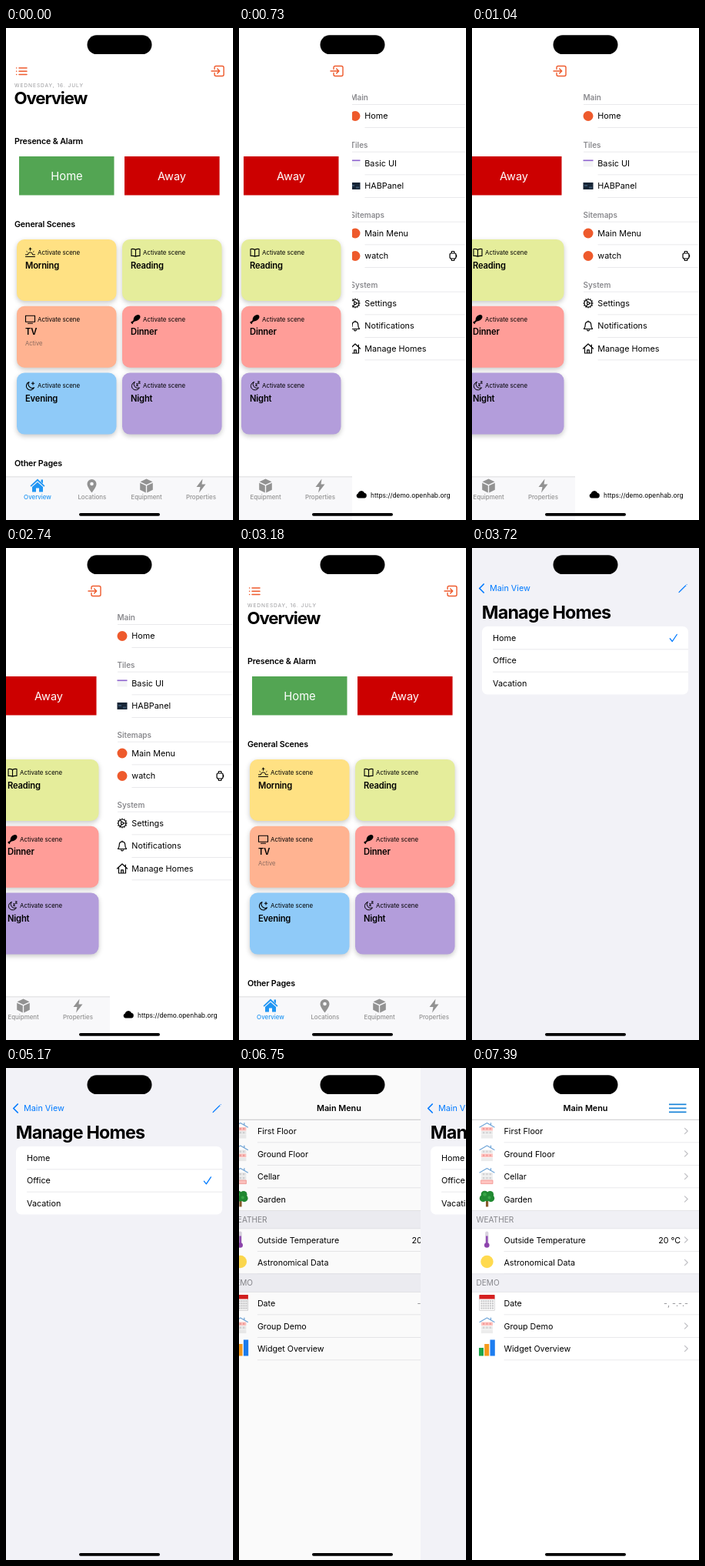
These frames come from a looping animation (295x640 px, 8 s). An HTML page with a canvas:

```html
<!DOCTYPE html>
<html lang="en">
<head>
<meta charset="utf-8">
<title>Smart home app</title>
<style>
html, body { margin: 0; width: 100%; height: 100%; overflow: hidden; background: #fff; }
canvas { display: block; width: 295px; height: 640px; }
</style>
</head>
<body>
<canvas id="stage" width="295" height="640"></canvas>
<script>
const W = 295, H = 640, LOOP = 8000, MENU_WIDTH = 161, HOME_CHOSEN = 5170;
const BLUE = '#007aff', ORANGE = '#ee5a2c', GRAY = '#8a8a8e', LINE = '#e2e2e5', PAPER = '#f2f2f7';
const ctx = document.getElementById('stage').getContext('2d');

// Moments at which the screen refreshes.
const TICKS = [0, 500, 610, 720, 830, 930, 1040, 2740, 2860, 2960, 3070, 3180, 3290, 3410,
  3510, 3620, 3720, HOME_CHOSEN, 6460, 6630, 6740, 6850, 6970, 7080, 7390];

// Critically damped spring from 0 to 1.
function spring(t, start, rate) {
  const u = Math.max(0, t - start) / 1000 * rate;
  return 1 - (1 + u) * Math.exp(-u);
}

// Text placed by the middle of its capitals.
function text(str, x, y, size, { color = '#000', weight = 400, align = 'left', track = 0 } = {}) {
  ctx.font = `${weight} ${size}px Inter, sans-serif`;
  ctx.letterSpacing = `${track * size}px`;
  ctx.textAlign = align;
  ctx.fillStyle = color;
  ctx.fillText(str, x, y + size * 0.364);
}

function rect(x, y, w, h, color, radius = 0) {
  ctx.fillStyle = color;
  ctx.beginPath();
  ctx.roundRect(x, y, w, h, radius);
  ctx.fill();
}

function disc(x, y, r, color) {
  ctx.fillStyle = color;
  ctx.beginPath();
  ctx.arc(x, y, r, 0, Math.PI * 2);
  ctx.fill();
}

function at(x, y, draw) {
  ctx.save();
  ctx.translate(x, y);
  draw();
  ctx.restore();
}

function stroke(path, x, y, color = '#000', width = 1.1) {
  at(x, y, () => {
    ctx.strokeStyle = color;
    ctx.lineWidth = width;
    ctx.lineCap = ctx.lineJoin = 'round';
    ctx.stroke(new Path2D(path));
  });
}

function fill(path, x, y, color = '#000') {
  at(x, y, () => {
    ctx.fillStyle = color;
    ctx.fill(new Path2D(path), 'evenodd');
  });
}

const MOON = 'M-1.5-5A5.3 5.3 0 1 0 5 2.2A5 5 0 0 1-1.5-5Z';
const sceneIcons = {
  Morning: (x, y) => stroke('M-6 5.5H6M-6 2.9H-3.1A3.1 3.1 0 0 1 3.1 2.9H6M0-2.6V-5.8M-1.6-4.3L0-5.9L1.6-4.3M-4.6-1.4L-4-.9M4.6-1.4L4-.9', x, y, '#000', 1),
  Reading: (x, y) => stroke('M0-3.5Q-2-5-5.5-4.5V4.5Q-2 4 0 5.3Q2 4 5.5 4.5V-4.5Q2-5 0-3.5V5', x, y),
  TV: (x, y) => stroke('M-6-4.5H6V3.5H-6ZM-3 5.5H3', x, y),
  Dinner: (x, y) => {
    fill('M-2.5 2.5C-4-2 0-6 3.5-5.8C6.5-5.5 6.8-2 4.5.2C2.5 2.2 0 3-2.5 2.5Z', x, y);
    stroke('M-2 2L-4.5 4.3M-4.6 3.8L-5.2 4.2M-4.2 4.5L-4.3 5.2', x, y, '#000', 1.9);
  },
  Evening: (x, y) => stroke(MOON + 'M3.5-5V-1.6M1.8-3.3H5.2', x, y),
  Night: (x, y) => stroke(MOON + 'M1-2.7H3L1-.2H3M3.8-5.7H5.8L3.8-3.4H5.8', x, y, '#000', 1),
};

const scenes = [
  ['Morning', '#ffe183'], ['Reading', '#e5ed9b'],
  ['TV', '#ffb391'], ['Dinner', '#ff9d98'],
  ['Evening', '#8fcaf8'], ['Night', '#b39ddb'],
];

function drawScene([name, color], i) {
  const x = i % 2 ? 151 : 14, y = 275 + Math.floor(i / 2) * 86.8;
  ctx.save();
  ctx.shadowColor = 'rgba(0,0,0,.22)';
  ctx.shadowBlur = 6;
  ctx.shadowOffsetY = 2.5;
  rect(x, y, 129.5, 80, color, 10);
  ctx.restore();
  sceneIcons[name](x + 17.5, y + 17);
  text('Activate scene', x + 27, y + 17, 7.9);
  text(name, x + 11, y + 33.5, 11.2, { weight: 600, track: -0.015 });
  if (name === 'TV') text('Active', x + 11, y + 48.5, 7.6, { color: '#8a6a5e' });
}

function drawTabs() {
  const gray = '#929292', active = '#2196f3';
  rect(0, 584, W, 56, '#f8f8fa');
  rect(0, 583.5, W, 0.8, '#cfcfd2');
  fill('M0-9L9.5 0L8.3 1.3L0-6.3L-8.3 1.3L-9.5 0ZM4.5-8H7V-3L4.5-5.2ZM0-4.8L7 1.6V8H2V3H-2V8H-7V1.6Z', 41, 595.5, active);
  fill('M0 9C-3 5-6 1-6-2.5A6 6 0 0 1 6-2.5C6 1 3 5 0 9ZM2.3-2.5A2.3 2.3 0 1 0-2.3-2.5A2.3 2.3 0 1 0 2.3-2.5Z', 111.5, 595.5, gray);
  fill('M0-9L8-5.3L0-1.6L-8-5.3ZM-8.3-3.8L-.7-.3V9L-8.3 5.3ZM8.3-3.8L.7-.3V9L8.3 5.3Z', 182.5, 595.5, gray);
  fill('M2-9L-6 1.5H-1L-2.5 9L6-2H1Z', 253.5, 595.5, gray);
  ['Overview', 'Locations', 'Equipment', 'Properties'].forEach((label, i) =>
    text(label, 41 + i * 70.8, 610, 7.9, { weight: 500, align: 'center', color: i ? gray : active }));
}

function drawOverview() {
  rect(0, 0, W, H, '#fff');
  stroke('M4 0H14M4 4.3H14M4 8.6H14M.6 0H.7M.6 4.3H.7M.6 8.6H.7', 13, 52, ORANGE, 1.5);
  stroke('M4 4V2Q4 0 6 0H14Q16 0 16 2V11Q16 13 14 13H6Q4 13 4 11V9M0 6.5H10.5M7.7 3.5L10.7 6.5L7.7 9.5', 267, 49.5, ORANGE, 1.4);
  text('WEDNESDAY, 16. JULY', 11, 75, 6.6, { color: '#98989b', track: 0.144 });
  text('Overview', 10.5, 90.7, 22.2, { weight: 700, track: -0.05 });
  const heading = { weight: 600, track: -0.015 };
  text('Presence & Alarm', 11, 147, 10.7, heading);
  text('General Scenes', 11, 255, 10.7, heading);
  text('Other Pages', 11, 566, 10.7, heading);
  rect(17, 167, 123.5, 50.5, '#53a553');
  rect(154, 167, 123.5, 50.5, '#cc0000');
  text('Home', 79, 192.5, 14.8, { color: '#fff', align: 'center' });
  text('Away', 215.5, 192.5, 14.5, { color: '#fff', align: 'center' });
  scenes.forEach(drawScene);
  drawTabs();
}

const dot = (x, y) => disc(x, y, 6.5, ORANGE);
const menuIcons = {
  'Basic UI': (x, y) => {
    rect(x - 6.5, y - 4.5, 13, 9, '#f4f4f6');
    rect(x - 6.5, y - 4.5, 13, 1.6, '#8e63cf');
  },
  HABPanel: (x, y) => {
    rect(x - 6.5, y - 4.5, 13, 9, '#172536');
    rect(x - 5, y - 1.5, 4, 2, '#36506b');
    rect(x + 1, y + 1, 4, 2, '#36506b');
  },
  Settings: (x, y) => {
    stroke('M5 0A5 5 0 1 0-5 0A5 5 0 1 0 5 0M1.6 0A1.6 1.6 0 1 0-1.6 0A1.6 1.6 0 1 0 1.6 0M1.6 0H5M-.8-1.4L-2.5-4.3M-.8 1.4L-2.5 4.3', x, y);
    for (let i = 0; i < 12; i++) {
      const a = i * Math.PI / 6;
      disc(x + 5.8 * Math.cos(a), y + 5.8 * Math.sin(a), 0.8, '#000');
    }
  },
  Notifications: (x, y) => stroke('M-5.5 4Q-3.8 2-3.8-1Q-3.8-5.3 0-5.6Q3.8-5.3 3.8-1Q3.8 2 5.5 4ZM-1.5 5.5Q0 7.3 1.5 5.5M0-5.6V-6.4', x, y, '#000', 1.2),
  'Manage Homes': (x, y) => stroke('M-6.5 0L0-6L6.5 0M-4.5-1V6H4.5V-1M-1.3 6V1.8H1.3V6M4.3-5V-2.5', x, y, '#000', 1.2),
};

const menu = [
  ['Main', 90.5, ['Home']],
  ['Tiles', 152, ['Basic UI', 'HABPanel']],
  ['Sitemaps', 243, ['Main Menu', 'watch']],
  ['System', 334, ['Settings', 'Notifications', 'Manage Homes']],
];

function drawMenu() {
  rect(0, 0, MENU_WIDTH, H, '#fff');
  for (const [title, y, items] of menu) {
    text(title, 10.5, y, 9.9, { weight: 600, color: GRAY });
    rect(11, y + 8.7, 149, 0.8, LINE);
    items.forEach((item, i) => {
      const rowY = y + 24 + i * 29.5;
      (menuIcons[item] || dot)(17, rowY);
      text(item, 29.3, rowY, 10.8);
      rect(29.5, rowY + 14.5, 130, 0.8, LINE);
    });
  }
  stroke('M-2-3.5H2Q4-3.5 4-1.5V1.5Q4 3.5 2 3.5H-2Q-4 3.5-4 1.5V-1.5Q-4-3.5-2-3.5ZM-2-4.2L-1.5-6H1.5L2-4.2M-2 4.2L-1.5 6H1.5L2 4.2M4.6-.8V.8', 144, 296.5, '#000', 1.2);
  fill('M-4 4.5A3.2 3.2 0 0 1-4.3-1.6A4.4 4.4 0 0 1 4-2.2A3.4 3.4 0 0 1 4 4.5Z', 25, 607);
  text('https://demo.openhab.org', 37, 607.5, 8.4);
}

function drawHomes(chosen, pressed) {
  rect(0, 0, W, H, PAPER);
  ctx.save();
  if (pressed) ctx.globalAlpha = 0.3;
  stroke('M5.5-5.5L0 0L5.5 5.5', 9.7, 52.5, BLUE, 1.7);
  text('Main View', 23, 52.5, 10.8, { color: BLUE });
  ctx.restore();
  stroke('M0 10L.8 8.6L8.6 1L9.2 1.5L1.5 9.2ZM10-.1L10.4.3', 269, 47.5, BLUE, 0.9);
  text('Manage Homes', 12.8, 83.5, 23.3, { weight: 700, track: -0.035 });
  rect(13, 102, 268, 88.5, '#fff', 7);
  ['Home', 'Office', 'Vacation'].forEach((name, i) => {
    const y = 117 + i * 29.4;
    text(name, 27, y, 10.8);
    if (i) rect(27, y - 15, 254, 0.8, LINE);
    if (i === chosen) stroke('M0 5.3L3 9L9 0', 257.3, y - 4.5, BLUE, 1.3);
  });
}

function houseIcon(floor) {
  return y => {
    for (let i = 0; i < 3; i++) {
      rect(12, y - 5 + i * 5, 15, 4.6, i === floor ? '#ffc4c0' : '#ececec');
      if (i < 2) for (let k = 0; k < 3; k++) rect(14 + k * 4.3, y - 4 + i * 5, 2.3, 2.3, i === floor ? '#f29c9a' : '#d2d2d4');
    }
    if (floor === 2) stroke('M0 0H15V4.6H0Z', 12, y + 5, '#f0908c', 0.8);
    stroke('M-9.5 5L0-.5L9.5 5M5-.5V2', 19.5, y - 10, '#6fa5d8', 1.2);
  };
}

function treeIcon(y) {
  rect(18, y, 3.2, 10, '#8a5a2b');
  for (const [dx, dy, r] of [[-5, 0, 4.7], [5, 0, 4.7], [-3, -5, 4.8], [4, -5, 4.6], [0, -1, 5]])
    disc(19.5 + dx, y + dy - 1, r, '#218a32');
  disc(16.5, y - 6, 2.3, '#38a747');
  disc(22.5, y - 2, 2, '#38a747');
}

function thermometerIcon(y) {
  rect(17.2, y - 11, 4.2, 19, '#d9d3df', 2);
  rect(18, y - 5, 2.6, 12, '#9350b5');
  disc(19.3, y + 7, 3.3, '#8e44ad');
}

function calendarIcon(y) {
  rect(9.5, y - 10, 20, 19.5, '#b9b9bb');
  rect(10, y - 9.5, 19, 18.5, '#fafafa');
  rect(9.5, y - 11, 20, 5.5, '#d51f1f');
  for (let i = 0; i < 24; i++)
    rect(11.5 + i % 6 * 2.9, y - 3.8 + Math.floor(i / 6) * 3.1, 2, 2, '#c5c5c7');
}

function barsIcon(y) {
  rect(9, y - 1, 6, 10.5, '#1ea64b');
  rect(16.2, y - 6, 6, 15.5, '#f79a1c');
  rect(23.5, y - 11.5, 6.3, 21, '#1d7df0');
}

const sitemap = [
  ['First Floor', 82, houseIcon(0)],
  ['Ground Floor', 111.5, houseIcon(1)],
  ['Cellar', 141, houseIcon(2)],
  ['Garden', 170.5, treeIcon],
  ['Outside Temperature', 223.5, thermometerIcon, '20 °C'],
  ['Astronomical Data', 253, y => disc(19.5, y - 1, 8.2, '#ffda4f')],
  ['Date', 306, calendarIcon],
  ['Group Demo', 335.5, houseIcon(0)],
  ['Widget Overview', 365, barsIcon],
];

function drawSitemap() {
  rect(0, 0, W, H, '#fff');
  text('Main Menu', 147.5, 52.5, 10.8, { weight: 600, align: 'center' });
  for (const y of [46.5, 51.5, 56.5]) rect(256, y, 22.5, 1.7, '#1683d8');
  rect(0, 66.8, W, 0.9, '#c9c9cb');
  for (const [label, y, icon, value] of sitemap) {
    icon(y);
    text(label, 41.5, y + 0.5, 10.7);
    rect(41.5, y + 14.5, W - 41.5, 0.8, LINE);
    if (value) text(value, 271, y + 0.5, 10.7, { align: 'right' });
    if (label === 'Date') text('-, -.-.-', 281, y + 0.5, 10.7, { align: 'right', color: GRAY });
    else stroke('M0-3.6L3.7 0L0 3.6', 276.5, y, '#c2c2c6', 1.3);
  }
  for (const [label, y] of [['WEATHER', 185], ['DEMO', 267.5]]) {
    rect(0, y, W, 24, '#f0f0f5');
    rect(0, y, W, 0.8, LINE);
    rect(0, y + 23.5, W, 0.8, LINE);
    text(label, 5.5, y + 12, 10.1, { color: '#85858a' });
  }
}

function drawScreen(t) {
  const switched = t >= HOME_CHOSEN;
  const slide = Math.round(MENU_WIDTH * (spring(t, 490, 18) - spring(t, 2733.5, 18)));
  const push = spring(t, 3211, 20) - spring(t, 6590, 20);

  // The menu lies still beneath the page that slides off it.
  if (slide > 0) at(W - MENU_WIDTH, 0, drawMenu);
  at(-slide - 0.3 * W * push, 0, switched ? drawSitemap : drawOverview);
  if (push > 0.001) {
    rect(0, 0, W, H, `rgba(0,0,0,${0.1 * push})`);
    at(Math.round(W * (1 - push)), 0, () => drawHomes(switched ? 1 : 0, t === 6460));
  }
}

function frame() {
  const now = performance.now() % LOOP;
  drawScreen(TICKS.findLast(tick => tick <= now));
  rect(105.5, 9.3, 84, 24.7, '#000', 12.3);
  rect(95, 631, 105, 3.7, '#000', 1.9);
  requestAnimationFrame(frame);
}
frame();
</script>
</body>
</html>
```
